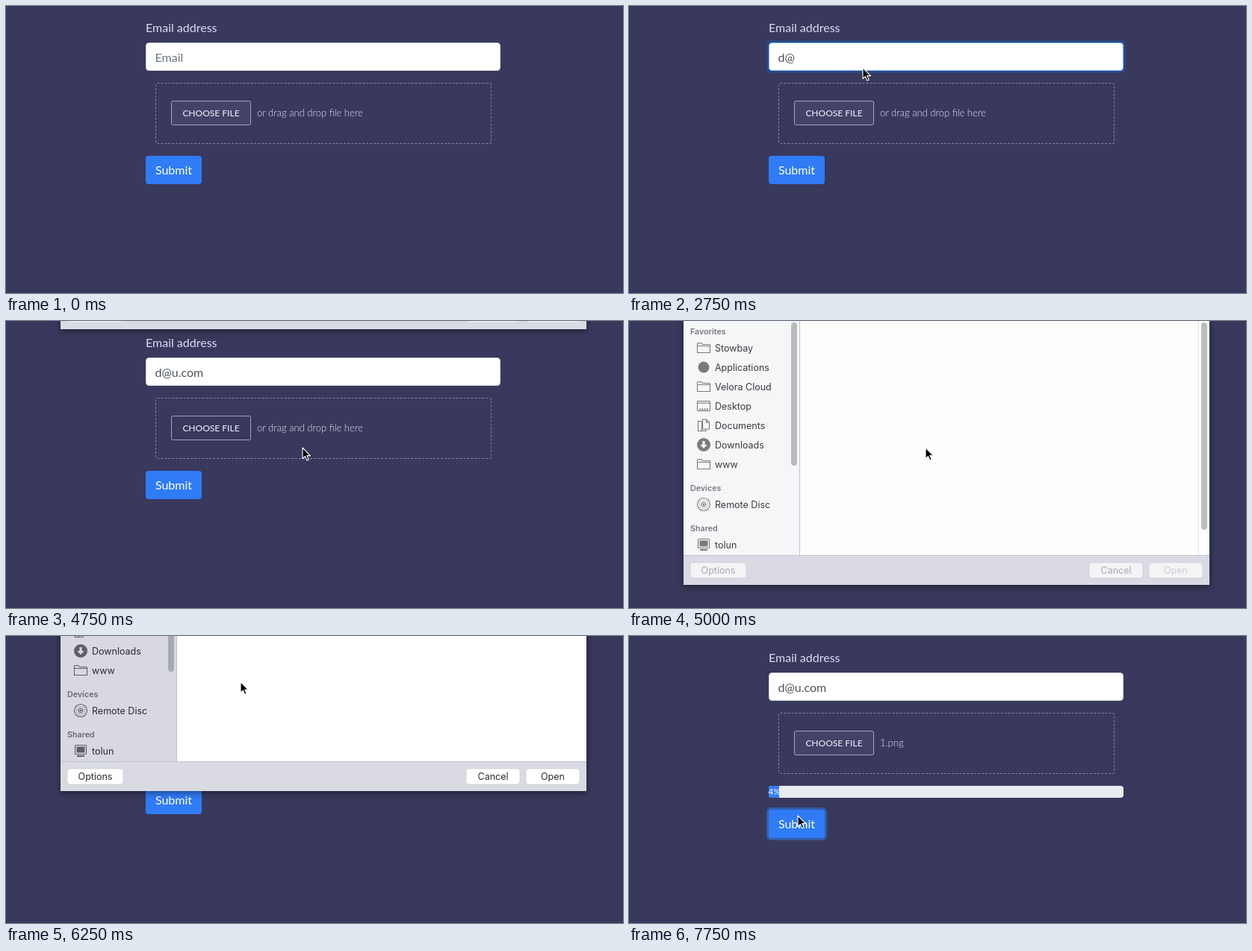
An HTML page that plays this animation: 826x385 px, repeating every 8 s.

```html
<!DOCTYPE html>
<html lang="en">
<head>
<meta charset="utf-8">
<title>Upload form</title>
<style>
html, body { margin: 0; width: 100%; height: 100%; overflow: hidden; background: #38395c; }
svg { display: block; width: 100vw; height: 100vh; }
text { white-space: pre; }
.form { font: 16px Lato, sans-serif; }
.light { font-size: 13px; font-weight: 300; fill: #e3e3f6; }
.dialog { font: 12.5px Inter, sans-serif; --side: #d7d8e1; --bar: #d9dae2; --btn: #fff; --ink: #2b2b30;
  --head: #686972; --icon: #5e5f68; --thumb: #a6a8b3; --main: #fff; --act: #2b2b30; --go: #2b2b30;
  filter: drop-shadow(0 3px 5px rgba(0, 0, 0, .4)); }
.dialog.idle { --side: #f4f6f7; --bar: #d9dae4; --btn: #f3f4f6; --ink: #3c3c40; --head: #77787d;
  --icon: #7b7b7d; --thumb: #bababc; --main: #fdfdfd; --act: #a9a9ae; --go: #cfcfd3; }
.head { font-size: 10.7px; font-weight: 600; fill: var(--head); }
.item { fill: var(--ink); }
.icon { fill: none; stroke: var(--icon); stroke-width: 1.1; }
.solid { fill: var(--icon); stroke: none; }
.name { font-size: 12px; text-anchor: middle; }
.kind { font-size: 8.5px; text-anchor: middle; fill: #77777c; }
</style>
</head>
<body>
<svg viewBox="0 0 826 385" preserveAspectRatio="none">
  <defs><clipPath id="track"><rect x="187" y="201" width="475" height="16" rx="4"/></clipPath></defs>
  <rect width="826" height="385" fill="#38395c"/>
  <g class="form">
    <text x="187" y="35" fill="#dcdcf3">Email address</text>
    <rect id="glow" x="184" y="46" width="481" height="44" rx="6" fill="#2a4a85"/>
    <rect id="field" x="187.5" y="49.5" width="474" height="37" rx="4" fill="#fff"/>
    <text id="email" x="199.5" y="75"></text>
    <rect id="caret" x="200" y="60" width="1" height="18" fill="#495057"/>
    <rect x="200.5" y="103.5" width="449" height="81" rx="2" fill="none" stroke="#8284aa" stroke-dasharray="3 2"/>
    <rect id="choose" x="221.5" y="127.5" width="106" height="32" rx="2" stroke="#a3a4c3"/>
    <text x="274.5" y="148" text-anchor="middle" fill="#e6e6f8" style="font-size:12px;font-weight:500">CHOOSE FILE</text>
    <text id="hint" class="light" x="336" y="148"></text>
    <g id="progress" clip-path="url(#track)">
      <rect x="187" y="201" width="475" height="16" fill="#e9ecef"/>
      <rect x="187" y="201" width="14" height="16" fill="#2f7cf6"/>
      <text x="194.5" y="213" text-anchor="middle" fill="#fff" style="font-size:12px">4%</text>
    </g>
    <g id="submit">
      <rect id="ring" x="184" y="198" width="81" height="44" rx="6" fill="#345da9"/>
      <rect x="187" y="201" width="75" height="38" rx="4" fill="#2f7cf6"/>
      <text x="224.5" y="226" text-anchor="middle" fill="#fff">Submit</text>
    </g>
  </g>
  <g id="dialog" class="dialog">
    <rect x="73" y="-40" width="704" height="395" fill="var(--bar)"/>
    <rect x="73" y="-40" width="155" height="355" fill="var(--side)"/>
    <rect x="229" y="-40" width="548" height="355" fill="var(--main)"/>
    <path d="M228.5 -40V315.5M73 315.5H777" stroke="#c3c4cb" fill="none"/>
    <rect x="217" y="3" width="8" height="192" rx="4" fill="var(--thumb)"/>
    <g id="side"></g>
    <g id="scroll">
      <path d="M762.5 -40V315" stroke="#e4e4e6"/>
      <rect x="766" y="3" width="8" height="278" rx="4" fill="#bcbcbe"/>
    </g>
    <g id="files"></g>
    <g id="buttons"></g>
  </g>
  <path id="cursor" d="M0 0V14.6L3.4 11.5 5.8 17 8.2 16 5.8 10.6H10.4Z" fill="#000" stroke="#fff" stroke-width="1.1" stroke-linejoin="round"/>
</svg>
<script>
const STEP = 250, LOOP = 8000;
const $ = id => document.getElementById(id);
const show = (id, on) => $(id).setAttribute('display', on ? 'inline' : 'none');
const set = (id, name, value) => $(id).setAttribute(name, value);

// Sidebar icons, drawn around their own centre
const folder = '<path d="M-8.5 6V-5.5Q-8.5 -6.5 -7.5 -6.5H-3L-1.5 -4.5H7.5Q8.5 -4.5 8.5 -3.5V6.5H-8.5ZM-8.5 -2.5H8.5"/>';
const icons = {
  folder,
  dot: '<circle class="solid" r="7.5"/>',
  desk: '<rect x="-8.5" y="-6.5" width="17" height="13" rx="1"/><path d="M-8 -4H8"/><path d="M-6 4.5H6" stroke-width="2" stroke-dasharray="2 1.3"/>',
  docs: '<path d="M-2.5 7.5H-7.5V-5.5H-2.5M-1.5 -8H3.5L7.5 -4V5H-1.5ZM3.5 -8V-4H7.5"/><path d="M-2.5 -5.5V7.5H3V5"/>',
  down: '<circle class="solid" r="9"/><path d="M-1.6 -5H1.6V0H4.8L0 5 -4.8 0H-1.6Z" fill="var(--side)" stroke="none"/>',
  disc: '<circle r="8.5"/><circle r="5.5" stroke-opacity=".4"/><circle r="2.8"/><circle r=".8"/>',
  screen: '<rect x="-7.5" y="-7.5" width="15" height="12" rx="1"/><rect class="solid" x="-5.5" y="-5.5" width="11" height="8"/><path d="M-5 7H5" stroke-width="2"/>'
};
const head = (y, label) => `<text class="head" x="82" y="${y + 4}">${label}</text>`;
const item = (y, icon, label) =>
  `<g class="icon" transform="translate(100 ${y})">${icons[icon]}</g><text class="item" x="115" y="${y + 4.5}">${label}</text>`;
const places = [['folder', 'Stowbay'], ['dot', 'Applications'], ['folder', 'Velora Cloud'], ['desk', 'Desktop'],
  ['docs', 'Documents'], ['down', 'Downloads'], ['folder', 'www']];
$('side').innerHTML = head(15, 'Favorites') + places.map((p, i) => item(37 + 26 * i, ...p)).join('') +
  head(225, 'Devices') + item(247, 'disc', 'Remote Disc') + head(279, 'Shared') + item(301, 'screen', 'tolun');

const button = (x, w, label, ink) =>
  `<rect x="${x}" y="325" width="${w}" height="21" rx="4" fill="var(--btn)" stroke="#c6c7cf" stroke-width=".6"/>
   <text x="${x + w / 2}" y="340" text-anchor="middle" fill="var(${ink})">${label}</text>`;
$('buttons').innerHTML = button(82, 75, 'Options', '--act') + button(616, 72, 'Cancel', '--act') + button(696, 72, 'Open', '--go');

const file = (x, kind) =>
  `<path d="M${x - 22.5} 9.5h28l17 17v42h-45z" fill="#fff" stroke="#c9c9cd" stroke-width=".8"/>
   <path d="M${x + 5.5} 9.5q2 9 -1 14q10 -1 18 3z" fill="#ececee" stroke="#c9c9cd" stroke-width=".7"/>
   <rect x="${x - 14}" y="25" width="29" height="29" fill="#7590b8"/>
   <text class="kind" x="${x}" y="65">${kind}</text>`;
$('files').innerHTML =
  `<g id="picked"><rect x="252" y="4" width="72" height="72" rx="4" fill="#d6d6da"/>
   <rect x="269" y="78" width="37" height="17" rx="3" fill="#2863d3"/></g>` +
  file(288, 'PNG') + file(400, 'JPEG') +
  '<text id="first" class="name" x="287.5" y="91">1.png</text><text class="name" x="399.5" y="91" fill="#1d1d20">5.jpeg</text>';

// Pointer stops: step, x, y
const stops = [[2, 430, 10], [5, 313, 83], [15, 313, 83], [18, 397, 170], [21, 397, 170], [22, 360, 147],
  [24, 286, 39], [26, 342, 84], [29, 226, 230], [30, 226, 232], [31, 226, 241]];
function pointer(k) {
  const i = Math.max(1, stops.findIndex(s => s[0] >= k));
  const [a, ax, ay] = stops[i - 1], [b, bx, by] = stops[i];
  const p = (k - a) / (b - a);
  return [ax + (bx - ax) * p, ay + (by - ay) * p];
}

const address = 'd@u.com';
const typedAt = { 11: 2, 12: 3, 13: 5 };
const slide = { 19: -344, 20: -1, 25: -147 };

function draw(ms) {
  const k = Math.floor(ms % LOOP / STEP);
  const typed = k < 11 ? 0 : typedAt[k] || 7;
  const focus = k >= 5 && k < 18;
  show('glow', focus);
  set('field', 'stroke', focus ? '#80b4fb' : '#ced4da');
  $('email').textContent = typed ? address.slice(0, typed) : 'Email';
  set('email', 'fill', typed ? '#495057' : '#6c757d');
  show('caret', focus && !typed && (k < 7 || k > 8));
  set('choose', 'fill', k >= 17 && k < 26 ? '#38395c' : '#424367');
  $('hint').textContent = k < 27 ? 'or drag and drop file here' : '1.png';

  const sent = k === 31;
  show('progress', sent);
  show('ring', sent);
  set('submit', 'transform', `translate(0 ${sent ? 32 : 0})`);

  const idle = k < 21, picked = k >= 24;
  show('dialog', k >= 19 && k < 26);
  set('dialog', 'transform', `translate(0 ${slide[k] || 0})`);
  set('dialog', 'class', idle ? 'dialog idle' : 'dialog');
  show('scroll', idle);
  show('files', !idle);
  show('picked', picked);
  set('first', 'fill', picked ? '#fff' : '#1d1d20');

  show('cursor', k >= 2);
  if (k >= 2) set('cursor', 'transform', `translate(${pointer(k).join(' ')})`);
}

const start = performance.now();
function tick() {
  draw(performance.now() - start);
  requestAnimationFrame(tick);
}
draw(0);
requestAnimationFrame(tick);
</script>
</body>
</html>
```
